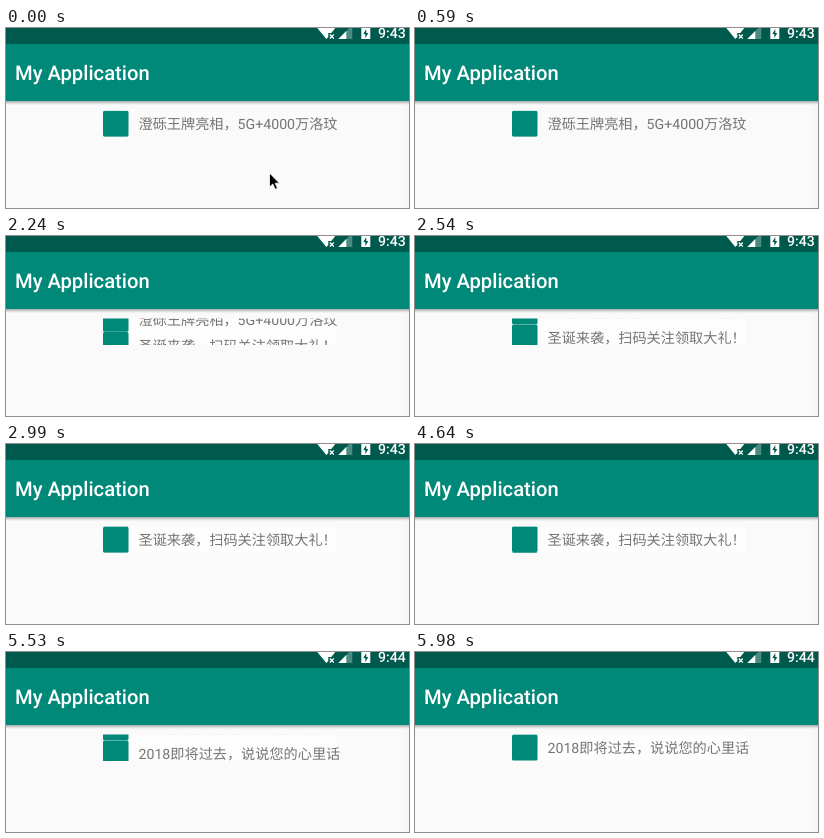
An HTML page for the animation above (6080 ms loop, 403x180 px).

```html
<!DOCTYPE html>
<html lang="zh-CN">
<head>
<meta charset="utf-8">
<title>My Application</title>
<style>
  html, body { margin: 0; width: 100%; height: 100%; overflow: hidden; background: #fafafa; }
  svg { display: block; }
  text { font-family: Roboto, "Noto Sans CJK SC", "Noto Sans CJK", sans-serif; text-rendering: geometricPrecision; }
  .bar { fill: #fff; font-weight: 500; }
  .row text { font-size: 14.17px; fill: #757575; }
  .row rect { fill: #008878; }
</style>
</head>
<body>
<svg width="403" height="180" viewBox="0 0 403 180">
  <defs>
    <linearGradient id="shadow" x2="0" y2="1">
      <stop stop-color="#a9b1af"/>
      <stop offset="1" stop-color="#fafafa"/>
    </linearGradient>
    <linearGradient id="edge">
      <stop stop-color="#fafafa"/>
      <stop offset="1" stop-color="#f6f6f6"/>
    </linearGradient>
    <clipPath id="window"><rect x="97" y="82.5" width="306" height="26.5"/></clipPath>
  </defs>

  <rect width="403" height="180" fill="#fafafa"/>
  <rect x="392" y="73" width="11" height="107" fill="url(#edge)"/>
  <rect y="73" width="403" height="4" fill="url(#shadow)"/>
  <rect width="403" height="73" fill="#008878"/>
  <rect width="403" height="16" fill="#00594d"/>
  <text class="bar" x="9" y="52.3" font-size="20.2">My Application</text>

  <g fill="#fff" transform="translate(-.7 0)">
    <path d="M312 0H330L326 5H323V9L321 11Z"/>
    <path d="M324.5 6.5l4 4m0-4l-4 4" stroke="#fff" stroke-width="1.2"/>
    <path d="M333 11L347 -3V11Z" opacity=".3"/>
    <path d="M333 11L341 3V11Z"/>
    <path d="M356 0H365V11H356Z"/>
    <path d="M361 1L358 6H360V10L363 5H361Z" fill="#00594d"/>
  </g>
  <text class="bar" id="clock" x="372" y="10.2" font-size="14.1">9:43</text>

  <rect id="panel" x="123" y="83" width="208" height="26" fill="#fdfdfd"/>
  <g id="rows" clip-path="url(#window)"></g>

  <path id="cursor" d="M0 0V14L3.3 11L5.7 16.3L8 15.3L5.7 10.2H10Z"
        fill="#000" stroke="#fff" stroke-width=".8"/>
</svg>
<script>
const LOOP = 6080, FLIP = 1500, STEP = 150, ROW = 26;
const headlines = ['澄砾王牌亮相，5G+4000万洛玟', '圣诞来袭，扫码关注领取大礼！', '2018即将过去，说说您的心里话'];
const byId = id => document.getElementById(id);
const [clock, panel, list, cursor] = ['clock', 'panel', 'rows', 'cursor'].map(byId);

list.innerHTML = headlines.map(text => `<g class="row">
  <rect x="97" y="82.8" width="25.5" height="25.8" rx="1.5"/>
  <text x="132.5" y="101.4">${text}</text></g>`).join('');
const rows = [...list.children];

// Accelerate-decelerate slide, advancing in discrete steps
function flip(t, start) {
  if (t < start) return 0;
  const elapsed = Math.floor((t - start) / STEP) * STEP + 140;
  return (1 - Math.cos(Math.PI * Math.min(1, elapsed / FLIP))) / 2;
}

function draw(now) {
  const t = now % LOOP;
  const scroll = flip(t, 1640) + flip(t, 4630);
  rows.forEach((row, i) => row.setAttribute('transform', `translate(0 ${(i - scroll) * ROW})`));
  panel.setAttribute('visibility', t < 1640 ? 'hidden' : 'visible');
  cursor.setAttribute('visibility', t < 590 ? 'visible' : 'hidden');
  cursor.setAttribute('transform', t < 440 ? 'translate(263.5 145)' : 'translate(310.5 169.5)');
  clock.textContent = t < 5230 ? '9:43' : '9:44';
  requestAnimationFrame(() => draw(performance.now()));
}
draw(0);
</script>
</body>
</html>
```
